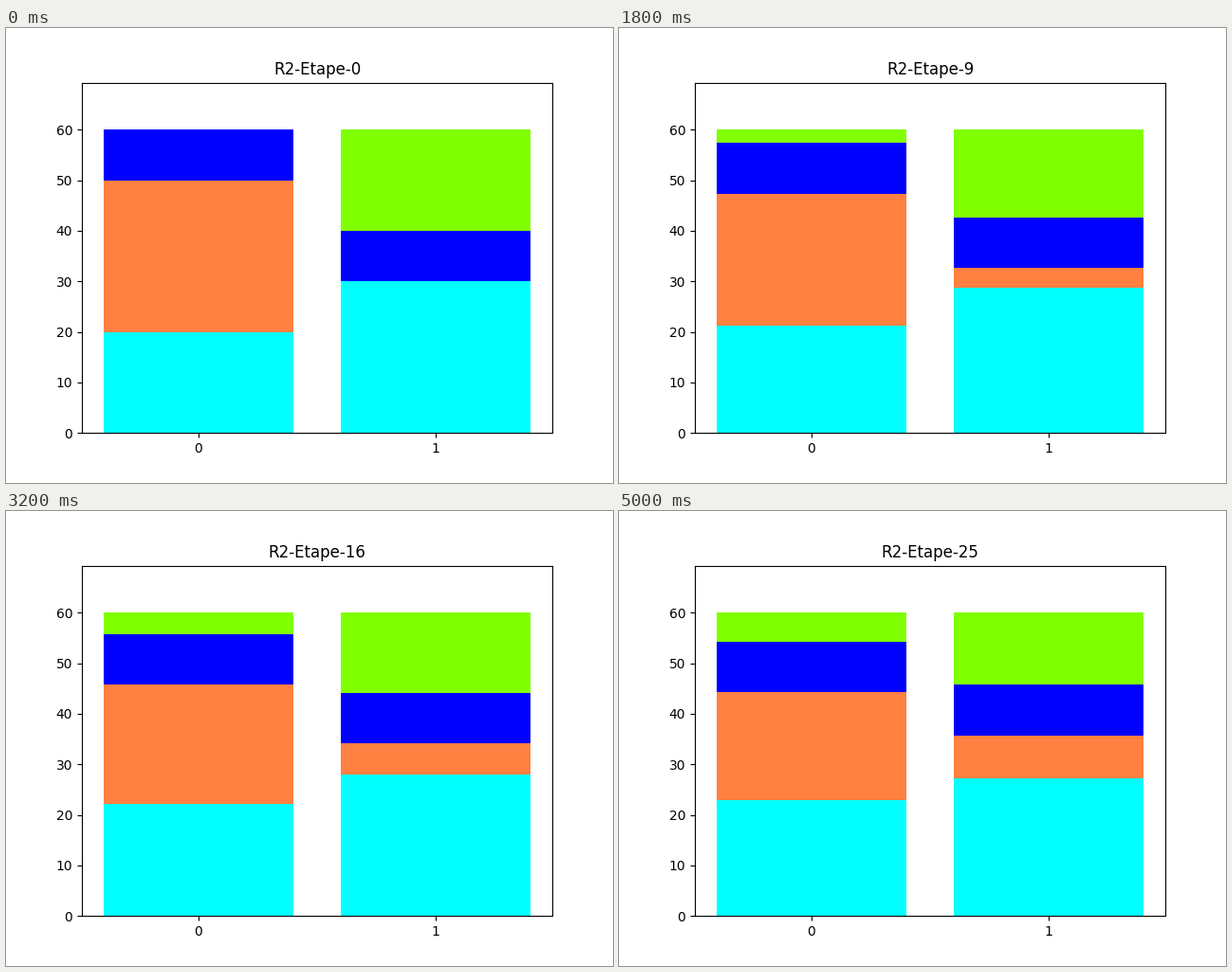
Recreate the animation shown at these times as a matplotlib script. Size 640 by 480 pixels, loop 5.2 s.

```python
import matplotlib.pyplot as plt
from matplotlib.animation import FuncAnimation

STEPS = 26
INTERVAL = 200
VOLUME = 60
RATE = 1 - 2 / VOLUME  # one unit swapped each way per step

COLORS = ["#00ffff", "#ff8040", "#0000ff", "#80ff00"]
LEFT = [20, 30, 10, 0]
RIGHT = [30, 0, 10, 20]

fig, ax = plt.subplots(figsize=(6.4, 4.8), dpi=100)
ax.set_xlim(-0.49, 1.49)
ax.set_ylim(0, 69.3)
ax.set_xticks([0, 1])
ax.set_yticks(range(0, 61, 10))
title = ax.set_title("")
layers = [ax.bar([0, 1], [0, 0], width=0.8, color=c) for c in COLORS]


def mix(a, b, step):
    """Amounts in both tanks after the given number of exchanges."""
    mean = (a + b) / 2
    gap = (a - b) / 2 * RATE ** step
    return mean + gap, mean - gap


def update(step):
    base = [0, 0]
    for bars, a, b in zip(layers, LEFT, RIGHT):
        for i, amount in enumerate(mix(a, b, step)):
            bars[i].set_y(base[i])
            bars[i].set_height(amount)
            base[i] += amount
    title.set_text(f"R2-Etape-{step}")
    return [title]


anim = FuncAnimation(fig, update, frames=STEPS, interval=INTERVAL,
                     init_func=lambda: update(0), repeat=True,
                     repeat_delay=0, blit=False)
plt.show()
```
